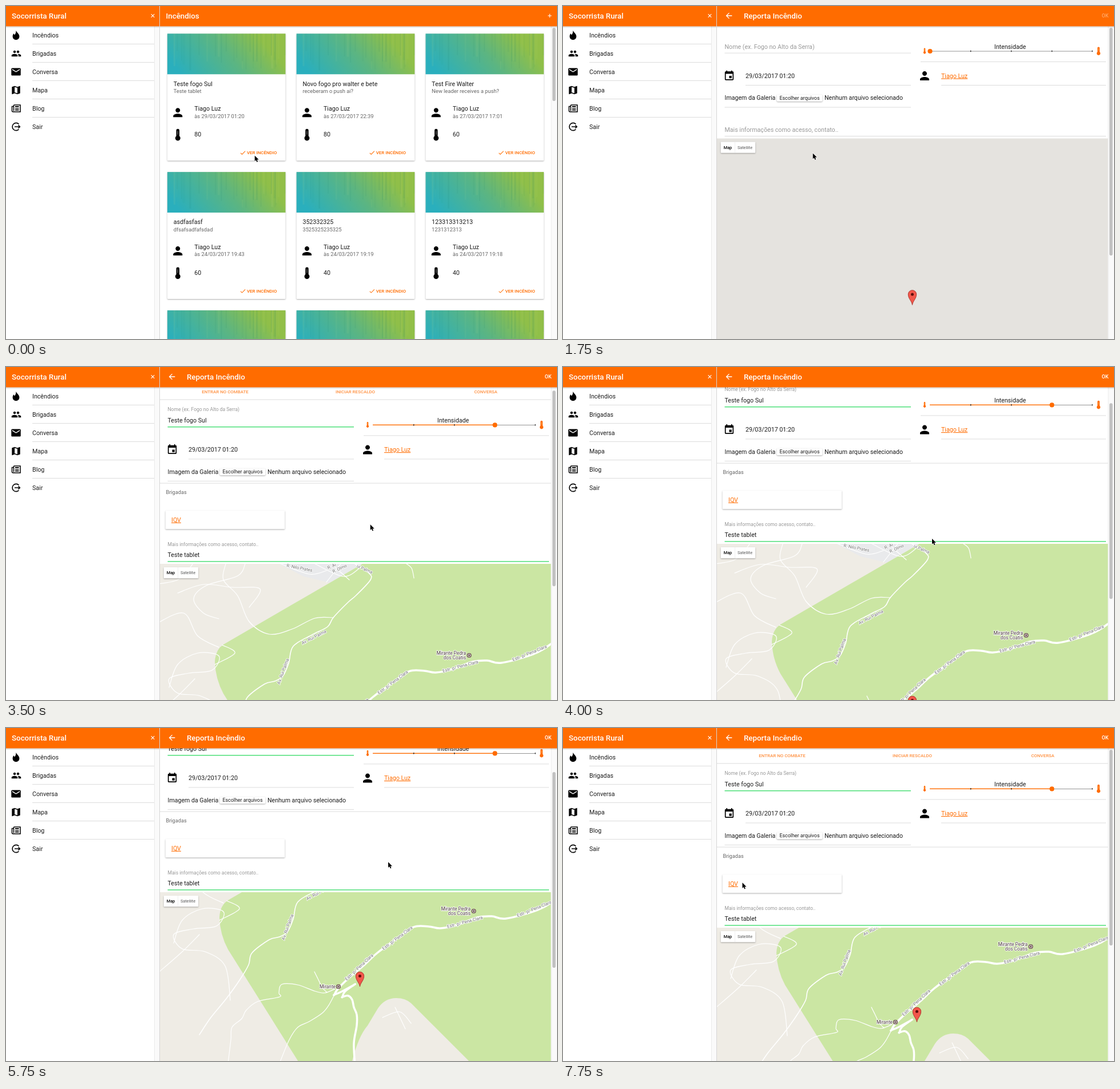
Recreate the animation shown at these times as an HTML page. Size 963 px wide and 582 px high, loop 8 s.

```html
<!DOCTYPE html>
<html lang="pt">
<head>
<meta charset="utf-8">
<title>Incêndios</title>
<style>
  html, body { margin: 0; width: 100%; height: 100%; overflow: hidden; background: #fff; }
  svg { display: block; width: 963px; height: 582px; font-family: Roboto, Arial, sans-serif; }
  .card { filter: drop-shadow(0 1px 1px rgba(0,0,0,.32)); }
  .road { fill: none; stroke: #fff; stroke-linecap: round; stroke-linejoin: round; }
  .halo { paint-order: stroke; stroke: #fff; stroke-width: 1.8px; stroke-linejoin: round; }
</style>
</head>
<body>
<svg id="stage" viewBox="0 0 963 582"></svg>
<script>
const ORANGE = '#ff6c00', LINE = '#dcdcdc', GREEN = '#32db64', INK = '#1c1c1c';
const LEADER = 'Tiago Luz', STREET = 'Av. Rui Palma', HIGHWAY = 'Estr. p/ Pena Clara';

const ICONS = {
  person: 'M12 12c2.21 0 4-1.79 4-4s-1.79-4-4-4-4 1.79-4 4 1.79 4 4 4zm0 2c-2.67 0-8 1.34-8 4v2h16v-2c0-2.66-5.33-4-8-4z',
  people: 'M16 11c1.66 0 3-1.34 3-3s-1.34-3-3-3-3 1.34-3 3 1.34 3 3 3zm-8 0c1.66 0 3-1.34 3-3S9.66 5 8 5 5 6.34 5 8s1.34 3 3 3zm0 2c-2.33 0-7 1.17-7 3.5V19h14v-2.5c0-2.33-4.67-3.5-7-3.5zm8 0c-.29 0-.62.02-.97.05 1.16.84 1.97 1.97 1.97 3.45V19h6v-2.5c0-2.33-4.67-3.5-7-3.5z',
  mail: 'M20 4H4c-1.1 0-2 .9-2 2v12c0 1.1.9 2 2 2h16c1.1 0 2-.9 2-2V6c0-1.1-.9-2-2-2zm0 4l-8 5-8-5V6l8 5 8-5v2z',
  map: 'M20.5 3L15 5.1 9 3 3.4 4.9c-.2.1-.4.3-.4.5v15.1c0 .3.2.5.5.5L9 18.9l6 2.1 5.6-1.9c.2-.1.4-.3.4-.5V3.5c0-.3-.2-.5-.5-.5zM15 19l-6-2.1V5l6 2.1V19z',
  drop: 'M12 1c1 4 8 8 8 14a8 8 0 0 1-16 0c0-3 1-5 3-7 0 2 1 3 2 3 2-2 3-6 3-10z',
  event: 'M17 12h-5v5h5v-5zM16 1v2H8V1H6v2H5c-1.1 0-2 .9-2 2v14c0 1.1.9 2 2 2h14c1.1 0 2-.9 2-2V5c0-1.1-.9-2-2-2h-1V1h-2zm3 18H5V8h14v11z',
  back: 'M20 11H7.83l5.59-5.59L12 4l-8 8 8 8 1.41-1.41L7.83 13H20v-2z',
  check: 'M9 16.17L4.83 12l-1.42 1.41L9 19 21 7l-1.41-1.41z'
};

const text = (x, y, s, size = 10.67, fill = INK, extra = '') =>
  `<text x="${x}" y="${y}" font-size="${size}" fill="${fill}" ${extra}>${s}</text>`;
const rect = (x, y, w, h, fill, extra = '') =>
  `<rect x="${x}" y="${y}" width="${w}" height="${h}" fill="${fill}" ${extra}/>`;
const rule = (x1, x2, y, color = LINE, h = 1) => rect(x1, y, x2 - x1, h, color);
const stroke = (d, color, w) => `<path d="${d}" fill="none" stroke="${color}" stroke-width="${w}"/>`;
const icon = (name, x, y, s = 1, fill = '#000') =>
  `<path d="${ICONS[name]}" fill="${fill}" transform="translate(${x} ${y}) scale(${s}) translate(-12 -12)"/>`;
const thermo = (x, y, s, fill) =>
  `<g transform="translate(${x} ${y}) scale(${s})"><path d="M-2.6 2.4V-7a2.6 2.6 0 0 1 5.2 0V2.4a4.3 4.3 0 1 1-5.2 0z" fill="${fill}"/>
   <path d="M0-6V0" stroke="#fff" stroke-opacity=".55" stroke-width="1"/></g>`;
const MID = 'text-anchor="middle"', BOLD = 'font-weight="500"';

function defs() {
  let seed = 7, trunks = '';
  const rnd = () => (seed = seed * 16807 % 2147483647) / 2147483647;
  for (let i = 0; i < 36; i++) {
    const x = rnd() * 205, h = 30 + rnd() * 35;
    trunks += rect(x, 0, 1 + rnd() * 3, h, i % 3 ? '#17756a' : '#c5e08a', `opacity="${.03 + rnd() * .07}"`);
  }
  return `<defs>
    <linearGradient id="wood" x2="1" y1=".6" y2=".3"><stop stop-color="#2aafbd"/><stop offset=".5" stop-color="#5cb581"/><stop offset=".85" stop-color="#8fbf49"/><stop offset="1" stop-color="#93bf48"/></linearGradient>
    <linearGradient id="shade" x2="0" y2="1"><stop stop-opacity=".2"/><stop offset="1" stop-opacity="0"/></linearGradient>
    <g id="pic">${rect(0, 0, 206.5, 71, 'url(#wood)')}${trunks}</g>
    <clipPath id="view">${rect(269, 0, 694, 582)}</clipPath>
    <clipPath id="mapview">${rect(269, 349, 684, 420)}</clipPath>
  </defs>`;
}

function sidebar() {
  const names = ['Incêndios', 'Brigadas', 'Conversa', 'Mapa', 'Blog', 'Sair'];
  const marks = [icon('drop', 17.5, 51, .74), icon('people', 18, 83, .75), icon('mail', 17.5, 115, .82), icon('map', 17.5, 147, .8),
    stroke('M13.5 173H25V185H12.5Q10.5 185 10.5 183V175.5H13.5M13.5 173V183.5M16 179.5H22.5M16 182H22.5', '#000', 1.5) + stroke('M16 176H22.5', '#000', 2),
    stroke('M22.5 206.5A6.6 6.6 0 1 0 22.5 215.5M15 211H24M21.5 208.2L24.3 211L21.5 213.8', '#000', 1.6)];
  return rect(0, 0, 268, 582, '#fff') + rect(259, 35, 9, 547, '#fafafa') + rect(259, 35, 1, 547, '#ebebeb') +
    names.map((n, i) => marks[i] + text(46, 54.5 + 32 * i, n) + (i < 5 ? rule(46, 259, 66 + 32 * i) : '')).join('') +
    rect(0, 35.5, 268, 3, 'url(#shade)') + rect(0, 0, 268, 35.5, ORANGE) +
    text(10, 21.7, 'Socorrista Rural', 13.33, '#fff', BOLD) +
    stroke('M253.7 14.2L259.3 19.8M259.3 14.2L253.7 19.8', '#fff', 1.1) +
    rect(268, 0, 1, 582, '#d6d6d6');
}

const header = inner => rect(269, 35.5, 694, 3, 'url(#shade)') + rect(269, 0, 694, 35.5, ORANGE) + inner;
const track = rect(952.5, 35, 10.5, 547, '#fafafa') + rect(952.5, 35, 1, 547, '#ececec');
const thumb = (h, id = '') => rect(955, 38, 5.6, h, '#c1c1c1', `rx="2.8" ${id}`);

function fireCard(x, y, [name, note, date, heat]) {
  return `<g transform="translate(${x} ${y})">${rect(0, 0, 206.5, 222, '#fff', 'class="card" rx="1.3"')}<use href="#pic"/>` +
    text(10.7, 91.3, name) + text(10.7, 103.6, note, 9.33, '#666') +
    icon('person', 18.3, 138) + text(47.3, 135.2, LEADER) + text(47.3, 147.3, 'às ' + date, 9.33, '#666') +
    thermo(18.3, 176.5, 1.05, '#000') + text(47.3, 180.2, heat) +
    icon('check', 132, 208.2, .5, ORANGE) + text(139, 210.9, 'VER INCÊNDIO', 7.9, ORANGE, BOLD) + '</g>';
}

function listPage() {
  const fires = [
    ['Teste fogo Sul', 'Teste tablet', '29/03/2017 01:20', 80],
    ['Novo fogo pro walter e bete', 'receberam o push ai?', '27/03/2017 22:39', 80],
    ['Test Fire Walter', 'New leader receives a push?', '27/03/2017 17:01', 60],
    ['asdfasfasf', 'dfsafsadfafsdad', '24/03/2017 19:43', 60],
    ['352332325', '3525325235325', '24/03/2017 19:19', 40],
    ['123313313213', '1231312313', '24/03/2017 19:18', 40]];
  let out = rect(269, 0, 694, 582, '#fff');
  for (let i = 0; i < 9; i++)
    out += fireCard(282 + 225.7 * (i % 3), 48.3 + 241.8 * (i / 3 | 0), fires[i] || ['', '', '', '']);
  return out + rect(406, 248, 72, 16, ORANGE, 'id="press" rx="1.5" opacity="0"') + track + thumb(128) +
    header(text(279.5, 21.7, 'Incêndios', 13.33, '#fff', BOLD) + stroke('M947 17H953.6M950.3 13.7V20.3', '#fff', 1.1));
}

// Catmull-Rom curve through a point string; a doubled point makes a corner.
function road(points, w = 1.4) {
  const p = points.split(' ').map(s => s.split(',').map(Number));
  const at = i => p[Math.max(0, Math.min(p.length - 1, i))];
  const lean = (a, b, c) => [0, 1].map(k => a[k] + (c[k] - b[k]) / 6);
  let d = `M${p[0]}`;
  for (let i = 0; i < p.length - 1; i++)
    d += `C${lean(at(i), at(i - 1), at(i + 1))} ${lean(at(i + 1), at(i + 2), at(i))} ${at(i + 1)}`;
  return `<path class="road" d="${d}" stroke-width="${w}"/>`;
}
const pin = (x, y) => `<g transform="translate(${x} ${y})"><path d="M0 0C-1-7-7.2-11-7.2-18.6a7.2 7.2 0 0 1 14.4 0C7.2-11 1-7 0 0z" fill="#f2574b" stroke="#a8322b" stroke-width=".9"/><circle cy="-18.5" r="2.5" fill="#5e0f0c"/></g>`;
const spot = (x, y) => `<circle cx="${x}" cy="${y}" r="4.1" fill="#755b5b"/><circle cx="${x}" cy="${y}" r="2.2" fill="none" stroke="#fff" stroke-width=".8"/>`;
const label = (x, y, a, s, size = 7.8, anchor = 'middle') =>
  text(0, 2.7, s, size, '#6d6d6d', `class="halo" text-anchor="${anchor}" transform="translate(${x} ${y}) rotate(${a})"`);
const poi = (x, y, s) => text(x, y, s, 8.3, '#4d3d3d', 'class="halo" text-anchor="end"');

function terrain() {
  const thin = [
    '384,344 380,372 405,400 425,445 460,467 500,458 540,439 572,438',
    '567,640 549,647 532,644 502,633 474,632 469,647 470,654 432,662 412,677 404,692 387,707 385,729 380,770',
    '570,642 557,667 545,682 522,697 502,707 487,729 470,770', '531,610 537,622 545,638 553,646', '700,344 709,352 713,369',
    '418,344 405,365 350,382 328,405 345,430 372,440', '300,395 345,380 395,385 444,388 425,420',
    '260,380 300,372 322,350 326,344', '285,560 300,520 335,500 372,505 360,530 320,535 285,545 300,570 340,575 375,600 384,660',
    '260,610 300,575 330,545', '378,486 400,500 365,520', '260,450 310,430 335,470 372,490',
    '480,344 530,362 560,356', '540,344 590,366 620,350', '560,376 585,344', '600,372 575,350',
    '650,690 680,680 700,700', '672,672 690,710'];
  return rect(200, 300, 820, 520, '#efece5') +
    '<path d="M470 340H630L566 377L520 366Z" fill="#e9eaec"/>' +
    '<path d="M630 340L380 485Q366 494 365 515Q366 545 380 571L508 775H1020V300H699Z" fill="#cbe6a3"/>' +
    '<path d="M595 775Q606 725 624 704L642 674Q654 656 674 656Q690 656 700 665L737 702L810 775Z" fill="#efece5"/>' +
    thin.map(p => road(p, 1.2)).join('') +
    road('610,344 634,360 637,372 612,399 597,412 572,438 562,454 535,468 502,488 494,518 484,540 470,549 452,554 422,577 416,598 400,625 377,657 350,690 330,720', 1.6) +
    road('959,410 963,440 965,468 951,485 921,502 866,517 841,513 816,515 781,528 751,534 731,531 704,532 671,555 641,577 616,600 590,622 572,640 566,650 566,650 578,645 600,633 600,633 584,645 580,654 580,654 590,652 597,659 600,672 605,685 605,704 600,735 602,775', 3.5) +
    label(538, 472, -27, STREET) + label(484, 532, -70, STREET) +
    label(513, 351, 11, 'R. Nilo Prates', 7.6) + label(583, 352, -24, 'R. Olmo', 7.6) + label(569, 348, -24, 'R. Al', 7.6) + label(627, 353, 24, 'ui Palma', 7.6) +
    label(676, 551, -37, HIGHWAY) + label(794, 523, -15, HIGHWAY) + label(915, 500, -22, HIGHWAY) + label(609, 602, -43, HIGHWAY) +
    label(957, 440, -68, HIGHWAY, 7.8, 'start') +
    poi(804, 502.5, 'Mirante Pedra') + poi(804, 511, 'dos Coatis') + spot(809.5, 504) +
    poi(568, 639, 'Mirante') + spot(573, 636) + pin(610.5, 636);
}

function mapSwitch(y) {
  return rect(275.7, y + 6, 60.5, 19.3, '#fff', 'class="card" rx="1"') + rect(300, y + 6, .6, 19.3, '#e6e6e6') +
    text(288, y + 18, 'Map', 7.33, '#000', MID + ' ' + BOLD) + text(318, y + 18, 'Satellite', 7.33, '#565656', MID);
}

// Rows shared by the blank form and the filled one.
function rows(dy, filled) {
  const knob = filled ? 854.5 : 641.5;
  return `<g transform="translate(0 ${dy})">` +
    rule(282.5, 608, 81.7, filled ? GREEN : LINE, filled ? 1.3 : 1) +
    text(781.5, 74.8, 'Intensidade', 10.67, INK, MID) +
    thermo(632, 78.3, .5, ORANGE) + thermo(936, 78.5, .74, ORANGE) +
    rule(641, 925, 78.6, '#8a8a8a', .9) + [712.5, 783.5, 854.5, 925].map(x => rect(x - .6, 77.7, 1.3, 2.4, '#222')).join('') +
    rect(641, 78.2, knob - 641, 1.4, ORANGE) + (filled ? rect(712, 77.7, 1.3, 2.2, '#222') + rect(783, 77.7, 1.3, 2.2, '#222') : '') +
    `<circle cx="${knob}" cy="79" r="4.1" fill="${ORANGE}"/>` + rule(625, 949, 97) +
    icon('event', 290.5, 122, .85) + text(319, 125.6, '29/03/2017 01:20') + rule(319, 608, 138) +
    icon('person', 632, 122) + text(661, 125.6, LEADER, 10.67, ORANGE, 'text-decoration="underline"') + rule(661, 949, 138) +
    text(282.5, 164.3, 'Imagem da Galeria', 10.6) + rect(373.5, 154.8, 80, 12, '#fff', 'rx="2" class="card"') +
    text(413.5, 164, 'Escolher arquivos', 8.9, INK, MID) + text(457, 164.3, 'Nenhum arquivo selecionado', 10.6) + rule(282.5, 608, 176.5) + '</g>';
}

const NAME = 'Nome (ex. Fogo no Alto da Serra)', INFO = 'Mais informações como acesso, contato..';

const blankForm = () => '<g id="blank">' + text(282.5, 74.8, NAME, 10.67, '#999') + rows(0, false) +
  text(282.5, 219.8, INFO, 10.67, '#999') + rule(282.5, 949, 227) + rect(269, 231.5, 684, 351, '#e5e3df') +
  `<g id="blankMap">${mapSwitch(231.5)}${pin(610.5, 522.5)}</g>${track}${thumb(398)}</g>`;

const filledForm = () => '<g id="filled"><g id="scroll">' +
  [[383, 'ENTRAR NO COMBATE'], [610.5, 'INICIAR RESCALDO'], [838.5, 'CONVERSA']]
    .map(([x, s]) => text(x, 51, s, 7.9, ORANGE, MID + ' ' + BOLD + ' opacity=".75"')).join('') + rule(269, 953, 61.5) +
  text(282.5, 82.3, NAME, 8.53, '#999') + text(282.5, 102.2, 'Teste fogo Sul') + rows(27.4, true) +
  rule(269, 953, 207.6) + text(279.5, 226.8, 'Brigadas', 9.2, '#666') +
  rect(278.7, 256, 208.5, 32.3, '#fff', 'class="card" rx="1"') + text(289, 275.8, 'IQV', 10.67, ORANGE, 'text-decoration="underline"') +
  text(282.5, 317.5, INFO, 8.53, '#999') + text(282.5, 337.2, 'Teste tablet') + rule(282.5, 949, 344.3, GREEN, 1.3) +
  `<g clip-path="url(#mapview)"><g id="land">${terrain()}</g></g>` +
  rect(269, 349, 684, 90, '#e5e3df', 'id="cover"') + mapSwitch(349) + '</g>' + track + thumb(342, 'id="thumb"') + '</g>';

const formPage = () => '<g id="form">' + rect(269, 0, 694, 582, '#fff') + blankForm() + filledForm() +
  header(icon('back', 290, 17, .67, '#fff') + text(316, 21.7, 'Reporta Incêndio', 13.33, '#fff', BOLD) +
    text(947.5, 20.3, 'OK', 9, '#fff', MID + ' ' + BOLD + ' id="ok"')) + '</g>';

const stage = document.getElementById('stage');
stage.innerHTML = defs() + `<g clip-path="url(#view)">${listPage()}${formPage()}</g>` + sidebar() +
  '<path id="cursor" d="M0 0V9.8L2.2 7.7L3.7 11.2L5.4 10.5L3.9 7.1H7Z" stroke="#fff" stroke-width="1.2" paint-order="stroke"/>';
const $ = id => document.getElementById(id);

// Each step lists only what changes at that time.
const steps = [
  { at: 0, x: 434.7, y: 261.5, press: 0, page: 0, rise: 0, filled: 0, blankMap: 0, cover: 400, scroll: 0, px: 0, py: 0 },
  { at: 500, x: 436.7, y: 257.5, press: .14 },
  { at: 750, press: .06 },
  { at: 1250, page: .75, rise: 8 },
  { at: 1500, page: 1, rise: 0 },
  { at: 1750, blankMap: 1 },
  { at: 2000, filled: 1 },
  { at: 2250, cover: 90 },
  { at: 2500, cover: 0 },
  { at: 2750, x: 500, y: 262 },
  { at: 3000, x: 585, y: 270 },
  { at: 3250, x: 630, y: 274.5 },
  { at: 3500, x: 636.7, y: 275.3, scroll: 5 },
  { at: 3750, x: 640, y: 284, scroll: 20 },
  { at: 4000, x: 645, y: 300, scroll: 40 },
  { at: 4250, x: 655, y: 325, scroll: 55 },
  { at: 4500, x: 668, y: 345, scroll: 62 },
  { at: 4750, x: 676.7, y: 354 },
  { at: 5000, x: 660.7, y: 321, px: -16, py: -33 },
  { at: 5250, x: 662, y: 290, px: -8, py: -66 },
  { at: 5500, x: 666, y: 258, px: 0, py: -100 },
  { at: 5750, x: 668, y: 234.3, px: 8, py: -127 },
  { at: 6500, scroll: 25 },
  { at: 6750, scroll: 0 },
  { at: 7250, x: 560, y: 250 },
  { at: 7500, x: 400, y: 272 },
  { at: 7750, x: 313.5, y: 270.3 }
];

const move = (id, x, y) => $(id).setAttribute('transform', `translate(${x} ${y})`);
const show = (id, on) => $(id).setAttribute('display', on ? 'inline' : 'none');

function draw(now) {
  const t = now % 8000;
  const s = Object.assign({}, ...steps.filter(k => k.at <= t));
  move('cursor', s.x, s.y);
  $('press').setAttribute('opacity', s.press);
  show('form', s.page);
  $('form').setAttribute('opacity', s.page);
  move('form', 0, s.rise);
  show('blank', !s.filled);
  show('blankMap', s.blankMap);
  show('filled', s.filled);
  $('ok').setAttribute('opacity', s.filled ? 1 : .4);
  $('cover').setAttribute('height', s.cover);
  move('scroll', 0, -s.scroll);
  move('thumb', 0, s.scroll * .63);
  move('land', s.px, 5 + s.py);
}

const start = performance.now();
function tick() {
  draw(performance.now() - start);
  requestAnimationFrame(tick);
}
tick();
</script>
</body>
</html>
```
